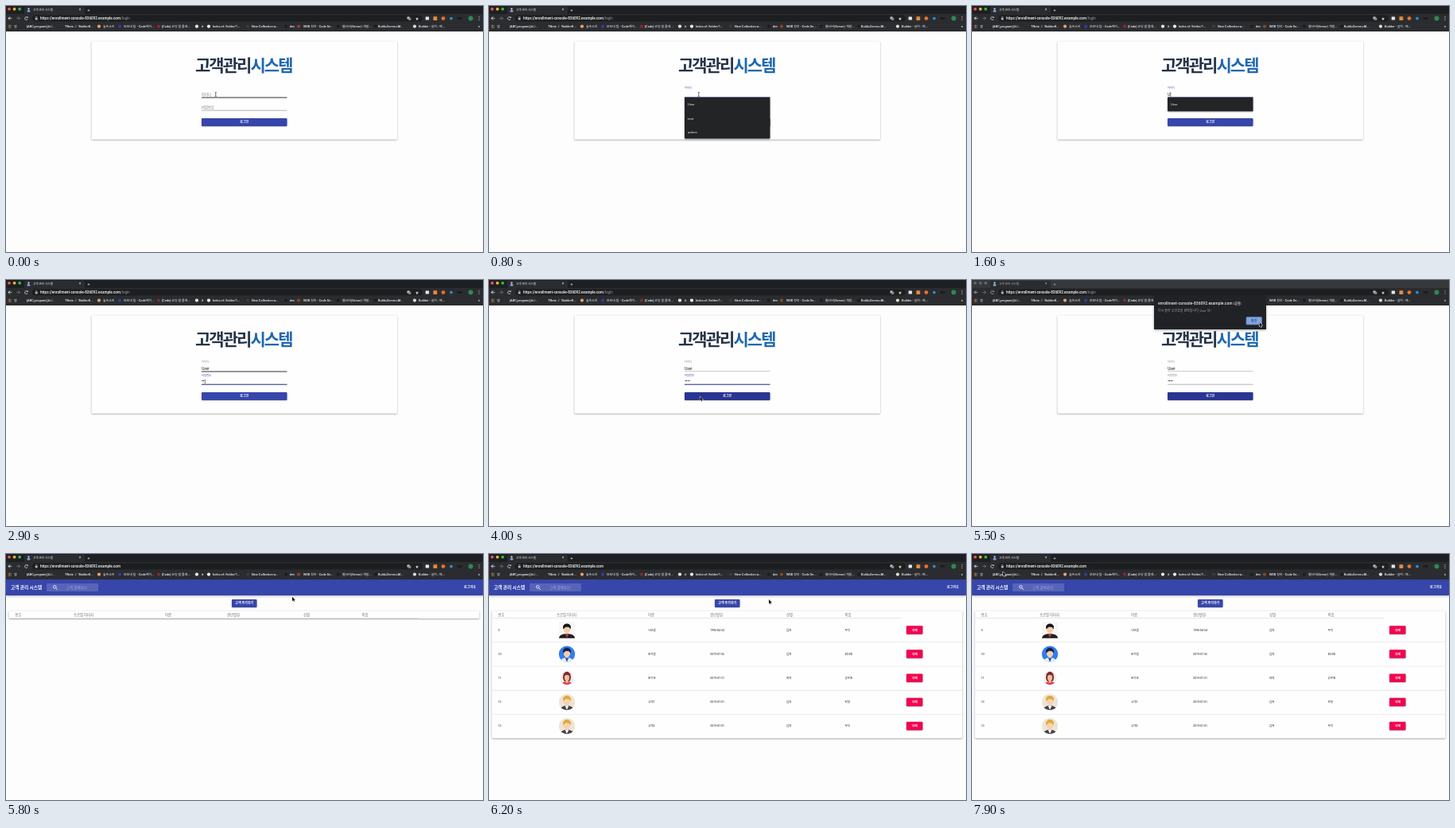
Recreate the animation shown at these times as an HTML page with a canvas. Size 600 by 309 pixels, loop 8000 ms.

```html
<!DOCTYPE html>
<html lang="ko">
<head>
<meta charset="utf-8">
<style>
html, body { margin: 0; width: 100%; height: 100%; overflow: hidden; background: #fdfdfd; }
canvas { display: block; width: 600px; height: 309px; }
</style>
</head>
<body>
<canvas id="stage"></canvas>
<script>
const LOOP = 8000, STEP = 100;
const HOST = 'enrollment-console-836092.example.com';
const FONT = 'Roboto, "Noto Sans CJK KR", "Noto Sans CJK JP", sans-serif';
const BLUE = '#3646aa', DARK_BLUE = '#2a3592', GREY = '#7c7c7c';
const dpr = window.devicePixelRatio || 1;

function context(canvas) {
  canvas.width = 600 * dpr;
  canvas.height = 309 * dpr;
  const c = canvas.getContext('2d');
  c.scale(dpr, dpr);
  return c;
}

const stage = context(document.getElementById('stage'));
const layer = context(document.createElement('canvas'));
let ctx = stage;

const clamp = v => Math.max(0, Math.min(1, v));
const span = (t, a, b) => clamp((t - a) / (b - a));
const mix = (a, b, k) => a + (b - a) * k;
const ease = k => k * k * (3 - 2 * k);

function text(str, x, y, size, color, weight = 400, align = 'left') {
  ctx.font = `${weight} ${size}px ${FONT}`;
  ctx.textAlign = align;
  ctx.fillStyle = color;
  ctx.fillText(str, x, y + size * 0.36);
  return x + ctx.measureText(str).width;
}

function box(x, y, w, h, color, r = 0) {
  ctx.fillStyle = color;
  ctx.beginPath();
  ctx.roundRect(x, y, w, h, r);
  ctx.fill();
}

function dot(x, y, r, color, ry = r) {
  ctx.fillStyle = color;
  ctx.beginPath();
  ctx.ellipse(x, y, r, ry, 0, 0, 7);
  ctx.fill();
}

function path(points, color, width = 0.7, fill = false) {
  ctx.beginPath();
  for (let i = 0; i < points.length; i += 2) ctx.lineTo(points[i], points[i + 1]);
  if (fill) {
    ctx.fillStyle = color;
    ctx.fill();
  } else {
    ctx.strokeStyle = color;
    ctx.lineWidth = width;
    ctx.stroke();
  }
}

function shadowed(blur, dy, alpha, draw) {
  ctx.save();
  ctx.shadowColor = `rgba(0,0,0,${alpha})`;
  ctx.shadowBlur = blur * dpr;
  ctx.shadowOffsetY = dy * dpr;
  draw();
  ctx.restore();
}

function button(x, y, w, h, label, color, size = 4) {
  shadowed(1.5, 0.6, 0.35, () => box(x, y, w, h, color, 1));
  text(label, x + w / 2, y + h / 2, size, '#fff', 700, 'center');
}

// Bookmark: icon x, icon colour, text x, label
const bookmarks = [
  [0, '', 10, '앱'],
  [0, '', 26, '[ABC,program],kL/...'],
  [0, '', 74, "TNote ♪ 'BuilderK..."],
  [117, '#e8a36a', 122, '숲속소리'],
  [143, '#2c3f9e', 148, '모모네 팀 - Code페이...'],
  [192, '#802c30', 196, '[Code] 코딩 앱 플레...'],
  [240, '#eee', 246, 'it'],
  [255, '#eee', 260, 'Index of /folder/1...'],
  [304, '#45382f', 309, 'New Collection w...'],
  [352, '#1c1d1f', 357, 'dev'],
  [368, '#8a4624', 374, 'WEB 정리 - Code Se...'],
  [418, '#1c1d1f', 423, '웹서버(Server) 개발...'],
  [465, '#1c1d1f', 468, 'Build+Server+M...'],
  [514, '#d8e0d0', 519, 'Builder - 설치 : 메...']
];

function browser(active, login) {
  const fg = active ? '#f1f2f4' : '#b4b6ba';
  const bar = '#2b2c2f';
  box(0, 0, 600, 32, bar);
  box(0, 0, 600, 10, active ? '#1e1f22' : '#37383c');
  box(23, 1, 76, 9.5, bar, 1.5);
  ['#f4574f', '#f6bb2f', '#2fc440'].forEach((c, i) => dot(4 + i * 6.6, 3.8, 1.9, active ? c : '#65666a'));
  dot(28.5, 3.6, 1.1, '#dfe6f2');
  dot(28.5, 6.4, 2, '#7fa4dc', 1.4);
  text('고객 관리 시스템', 34, 4.6, 3.6, fg, 500);
  text('×', 93, 4.6, 5, fg, 400, 'center');
  text('+', 104, 4.6, 6, fg, 400, 'center');

  path([7.4, 15.6, 3, 15.6, 5, 13.6, 3, 15.6, 5, 17.6], fg);
  path([13, 15.6, 17.4, 15.6, 15.4, 13.6, 17.4, 15.6, 15.4, 17.6], '#77797d');
  ctx.beginPath();
  ctx.arc(25.5, 15.6, 1.9, 0.5, 5.6);
  ctx.strokeStyle = fg;
  ctx.lineWidth = 0.7;
  ctx.stroke();
  path([27.7, 13.2, 27.7, 15, 25.9, 15], fg, 0, true);
  box(33, 11.6, 491, 8, '#1d1e20', 4);
  box(36.8, 15, 2.8, 2.4, '#b8babd');
  path([37.3, 15, 37.3, 13.6, 39.1, 13.6, 39.1, 15], '#b8babd', 0.5);
  const end = text('https://' + HOST, 43, 15.7, 4.6, '#fff', 500);
  if (login) text('/login', end, 15.7, 4.6, '#95999f');

  box(504.6, 13.4, 3.2, 3.2, '#c6c8cb', 0.4);
  box(506.2, 14.8, 3.2, 3.2, '#85888d', 0.4);
  text('★', 517, 15.5, 4.6, '#dfe1e4', 400, 'center');
  box(527.7, 13.6, 4.4, 4, '#e6e8ec', 0.5);
  box(537.5, 13.2, 4.8, 4.8, '#e58a40', 0.5);
  dot(550, 15.6, 2.4, '#e8722f');
  dot(560, 15.6, 1.9, '#2a8cd2');
  box(567.5, 14, 6, 3, '#1c1d1f', 1);
  dot(584.5, 15.6, 3, '#2d8a4c');
  [13.5, 15.5, 17.5].forEach(y => dot(595, y, 0.5, fg));

  for (let i = 0; i < 9; i++)
    box(2.7 + i % 3 * 1.5, 23.7 + Math.floor(i / 3) * 1.5, 1, 1, ['#e0584c', '#e8b23c', '#4c9f68'][i % 3]);
  for (const [ix, color, x, label] of bookmarks) {
    if (color) dot(ix, 25.6, 2.1, color);
    text(label, x, 25.7, 3.95, '#f2f3f5', 500);
  }
  text('»', 595, 25.4, 5, '#f2f3f5', 500, 'center');
}

// Floating label, value and underline of one form field
function field(y, label, value, lift, focus, hover, caret, weight = 400) {
  text(label, 246, mix(y, y - 7.8, lift), mix(4.35, 3.25, lift), focus ? '#3a49b4' : GREY);
  const end = value ? text(value, 246.2, y, 4.6, '#111', weight) : 246;
  if (caret) box(end + 0.4, y - 3, 0.6, 6, '#222');
  box(246, y + 3.4, 107.5, hover ? 1 : 0.6, hover ? '#333' : '#9a9a9a');
  if (focus) {
    const w = 107.5 * focus;
    box(299.75 - w / 2, y + 3.4, w, 0.9, '#3a479c');
  }
}

function suggestions(names) {
  shadowed(2, 0.8, 0.4, () => box(246, 115, 107.5, names.length * 17.2, '#222426', 0.8));
  names.forEach((n, i) => text(n, 250, 123.8 + i * 17.2, 4.3, '#f0f1f3'));
}

const typed = (t, times, str) => str.slice(0, times.filter(at => t >= at).length);

function blink(t, from) {
  return t >= from && Math.floor((t - from) / 500) % 2 === 0;
}

function loginPage(t) {
  shadowed(2, 0.7, 0.36, () => box(107.5, 44.5, 384.5, 123.2, '#fefefe', 1.2));
  ctx.letterSpacing = '-1.95px';
  const x = text('고객관리', 238, 74.5, 21, '#27344a', 700);
  text('시스템', x, 74.5, 21, '#2069b0', 700);
  ctx.letterSpacing = '0px';

  const id = typed(t, [1600, 1800, 1900, 2100], 'User');
  const secret = typed(t, [2700, 2900, 3000, 3100], '••••');
  const onId = t >= 300 && t < 2300, onSecret = t >= 2300 && t < 4200;
  const idCaret = t < 1600 ? blink(t, 300) : true;
  const secretCaret = t < 3100 ? true : blink(t, 3100);
  field(111, '아이디', id, ease(span(t, 300, 600)), onId && span(t, 300, 600), t < 3700, onId && idCaret);
  field(127.4, '비밀번호', secret, ease(span(t, 2200, 2500)), onSecret && span(t, 2200, 2500),
    t >= 3700 && t < 3900, onSecret && secretCaret, 700);
  button(246, 141, 107.5, 10, '로그인', t >= 4000 ? DARK_BLUE : BLUE);
  if (t >= 500 && t < 2300) suggestions(t < 1600 ? ['User', 'test', 'admin'] : ['User']);
}

// Painted on its own layer so that it fades as one piece
function alertBox(t) {
  const opening = t < 5600;
  const p = opening ? span(t, 4400, 4700) : 1 - span(t, 5600, 5800);
  if (!p) return;
  const inset = opening ? 6 * (1 - p) : 0;
  ctx = layer;
  ctx.clearRect(0, 0, 600, 309);
  ctx.save();
  ctx.translate(0, opening ? -9 * (1 - p) : 0);
  shadowed(3, 1, 0.35, () =>
    path([229 + inset, 20, 370 - inset, 20, 370, 62, 229, 62], '#212226', 0, true));
  text(HOST + ' 내용:', 234, 29, 5, '#e8eaed', 500);
  text('다시 돌아 오신것을 환영합니다, User 님!', 234, 38.4, 4, '#a2a6ab');
  box(344.5, 46, 20.5, 10.5, '#51698f', 1.6);
  box(345.2, 46.7, 19.1, 9.1, '#7fa3e4', 1.2);
  text('확인', 354.7, 51.2, 4, '#202a40', 500, 'center');
  ctx.restore();
  ctx = stage;
  ctx.globalAlpha = Math.pow(p, 1.4);
  ctx.drawImage(layer.canvas, 0, 0, 600, 309);
  ctx.globalAlpha = 1;
}

const people = [
  { bg: '#f8f6f4', square: true, hair: '#151515', skin: '#f0cfae', top: '#1e1e22', tie: '#b5383a' },
  { bg: '#327cf0', hair: '#17233f', skin: '#f6cfae', top: '#e9f0fa', tie: '#2755a8' },
  { bg: '#f1eeee', r: 8.5, long: true, hair: '#7b2f2c', skin: '#f3bf9c', top: '#dd3b4c' },
  { bg: '#efe3d5', hair: '#e0a83e', skin: '#f7d3ae', top: '#414451', tie: '#f4f4f4' },
  { bg: '#efe3d5', hair: '#e0a83e', skin: '#f7d3ae', top: '#414451', tie: '#f4f4f4' }
];

function avatar(y, p) {
  ctx.save();
  ctx.translate(98, y);
  ctx.beginPath();
  if (p.square) ctx.rect(-10, -10.2, 20, 20.4);
  else ctx.arc(0, 0, p.r || 10.2, 0, 7);
  ctx.clip();
  box(-11, -11, 22, 22, p.bg);
  if (p.long) dot(0, -0.5, 5, p.hair, 6);
  dot(0, 10, p.square ? 10 : 8.5, p.top, 5.6);
  box(-1.5, 2, 3, 4, p.skin);
  if (p.tie) path([-2.3, 4.8, 2.3, 4.8, 0, 10], p.tie, 0, true);
  dot(0, -3.4, p.long ? 4 : 4.9, p.hair, 4.6);
  dot(0, -0.6, p.long ? 3 : 4.1, p.skin, 4.4);
  path([-4.6, -1.5, -4.3, -5.5, 0, -7.5, 4.3, -5.5, 4.6, -1.5, 3, -3.4, -1, -4], p.hair, 0, true);
  ctx.restore();
}

const columns = [11.5, 85, 200, 278, 374, 447.5];
const rows = [
  ['9', '', '나보람', '1996-04-24', '남자', '무직'],
  ['10', '', '문가람', '2019-07-26', '남자', '회사원'],
  ['11', '', '문가온', '2019-07-21', '여자', '공무원'],
  ['12', '', '고객1', '2019-07-01', '남자', '학생'],
  ['13', '', '고객2', '2019-07-01', '남자', '무직']
];

function listPage(loaded) {
  shadowed(3, 1.2, 0.4, () => box(0, 31, 600, 21, BLUE));
  text('고객 관리 시스템', 6, 42, 5.65, '#fff', 700);
  box(51, 37, 65, 10, 'rgba(255,255,255,.16)', 1);
  ctx.beginPath();
  ctx.arc(61.3, 41.3, 1.8, 0, 7);
  ctx.strokeStyle = '#fff';
  ctx.lineWidth = 0.8;
  ctx.stroke();
  path([62.6, 42.6, 64.8, 44.8], '#fff', 0.9);
  text('고객 검색하기', 76, 42, 4.5, '#a7afd9');
  text('로그아웃', 591, 42, 4.1, '#fff', 700, 'right');
  button(284, 57, 31.5, 10, '고객 추가하기', BLUE);

  shadowed(2, 0.7, 0.4, () => box(3.5, 71.5, 592, loaded ? 160 : 9.5, '#fefefe', 1));
  ['번호', '프로필 이미지', '이름', '생년월일', '성별', '직업'].forEach((h, i) =>
    text(h, columns[i], 76, 4.35, '#707070'));
  box(4, 80.3, 514, 0.6, '#dedede');
  if (!loaded) return;
  rows.forEach((row, i) => {
    const y = 95.5 + i * 30.15;
    row.forEach((cell, c) => text(cell, columns[c], y, 3.6, '#222'));
    avatar(y, people[i]);
    button(525, y - 5.3, 20.5, 10.5, '삭제', '#f0064f', 3.9);
    if (i < 4) box(4, y + 15, 591, 0.6, '#dcdcdc');
  });
}

// Pointer stops: time, x, y
const stops = [
  [3500, 264, 111], [4100, 265.5, 149], [4700, 265.5, 149], [5300, 361.5, 53],
  [5700, 361.5, 53], [6100, 352, 57], [6300, 352, 57], [7200, 47, 28], [7500, 47, 28], [7900, 39, 22]
];

function pointer(t) {
  if (t >= 1600 && t < 3400) return;
  if (t < 3700) {
    const y = 111;
    path([262.6, y - 2.8, 263.8, y - 2.3, 265, y - 2.8], '#333', 0.6);
    path([263.8, y - 2.3, 263.8, y + 2.3], '#333', 0.7);
    path([262.6, y + 2.8, 263.8, y + 2.3, 265, y + 2.8], '#333', 0.6);
    return;
  }
  const i = Math.max(1, stops.findIndex(s => s[0] >= t));
  const [t0, x0, y0] = stops[i - 1], [t1, x1, y1] = stops[i];
  const k = ease(span(t, t0, t1));
  ctx.save();
  ctx.translate(mix(x0, x1, k), mix(y0, y1, k));
  const arrow = [0, 0, 0, 5.6, 1.3, 4.4, 2.1, 6.3, 3, 5.9, 2.2, 4.1, 3.9, 4, 0, 0];
  path(arrow, '#fff', 1);
  path(arrow, '#111', 0, true);
  ctx.restore();
}

function draw(t) {
  box(0, 0, 600, 309, '#fdfdfd');
  const login = t < 5800;
  if (login) loginPage(t);
  else listPage(t >= 6000);
  browser(t < 4400 || t >= 5700, login);
  alertBox(t);
  pointer(t);
}

const start = performance.now();
function frame() {
  const t = (performance.now() - start) % LOOP;
  draw(Math.floor(t / STEP) * STEP);
  requestAnimationFrame(frame);
}
frame();
</script>
</body>
</html>
```
